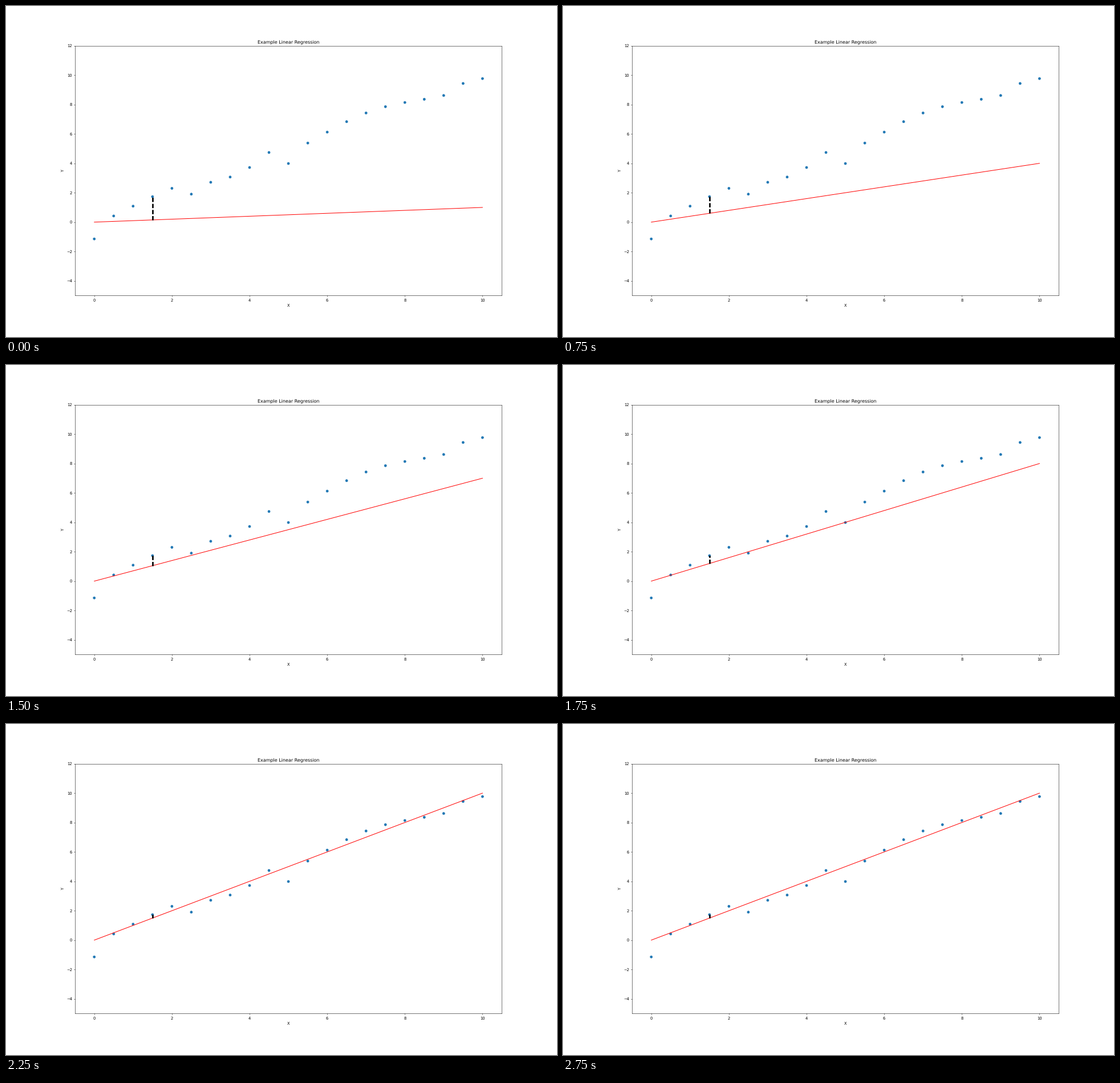
A matplotlib script that plays this animation: 966 px wide and 580 px high, repeating every 3000 ms.

```python
import numpy as np
import matplotlib.pyplot as plt
from matplotlib.animation import FuncAnimation

WIDTH, HEIGHT, DPI = 966, 580, 48.3
FRAMES, INTERVAL = 12, 250
MARK = 3  # index of the point whose residual is drawn

plt.rcParams["font.family"] = "DejaVu Sans"
plt.rcParams["text.hinting"] = "none"


def samples():
    """Points along y = x with a slowly growing wave and a few outliers."""
    x = np.linspace(0, 10, 21)
    wave = (0.25 + 0.025 * x) * np.cos(2 * np.pi * (x - 7) / 5)
    kicks = {0: -0.94, 5: -0.85, 6: -0.39, 7: -0.33,
             9: 0.6, 10: -0.71, 19: 0.42, 20: 0.17}
    y = x + wave
    for i, kick in kicks.items():
        y[i] += kick
    return x, y


x, y = samples()

# The tiny surplus keeps the pixel height from rounding down.
fig, ax = plt.subplots(figsize=(WIDTH / DPI, (HEIGHT + 0.001) / DPI), dpi=DPI,
                       facecolor="white")
fig.subplots_adjust(left=0.125, right=0.9, bottom=0.125, top=0.88)

ax.set_xlim(-0.5, 10.5)
ax.set_ylim(-5, 12)
ax.set_xticks(range(0, 11, 2))
ax.set_yticks(range(-4, 13, 2))
ax.set_title("Example Linear Regression")
ax.set_xlabel("X")
ax.set_ylabel("Y")

# One size per point keeps the markers at subpixel positions.
ax.scatter(x, y, s=np.full(x.size, 36), color="tab:blue")
fit, = ax.plot([], [], color="red", linewidth=1.5)
residual, = ax.plot([], [], color="black", linewidth=4, dashes=(2.78, 1.2))


def update(frame):
    # The slope grows by a tenth per step, then rests on the final fit.
    slope = min(frame + 1, 10) / 10
    fit.set_data(x, slope * x)
    residual.set_data([x[MARK]] * 2, [slope * x[MARK], y[MARK]])
    return fit, residual


anim = FuncAnimation(fig, update, frames=FRAMES, interval=INTERVAL,
                     init_func=lambda: update(0), repeat=True, repeat_delay=0)
plt.show()
```
